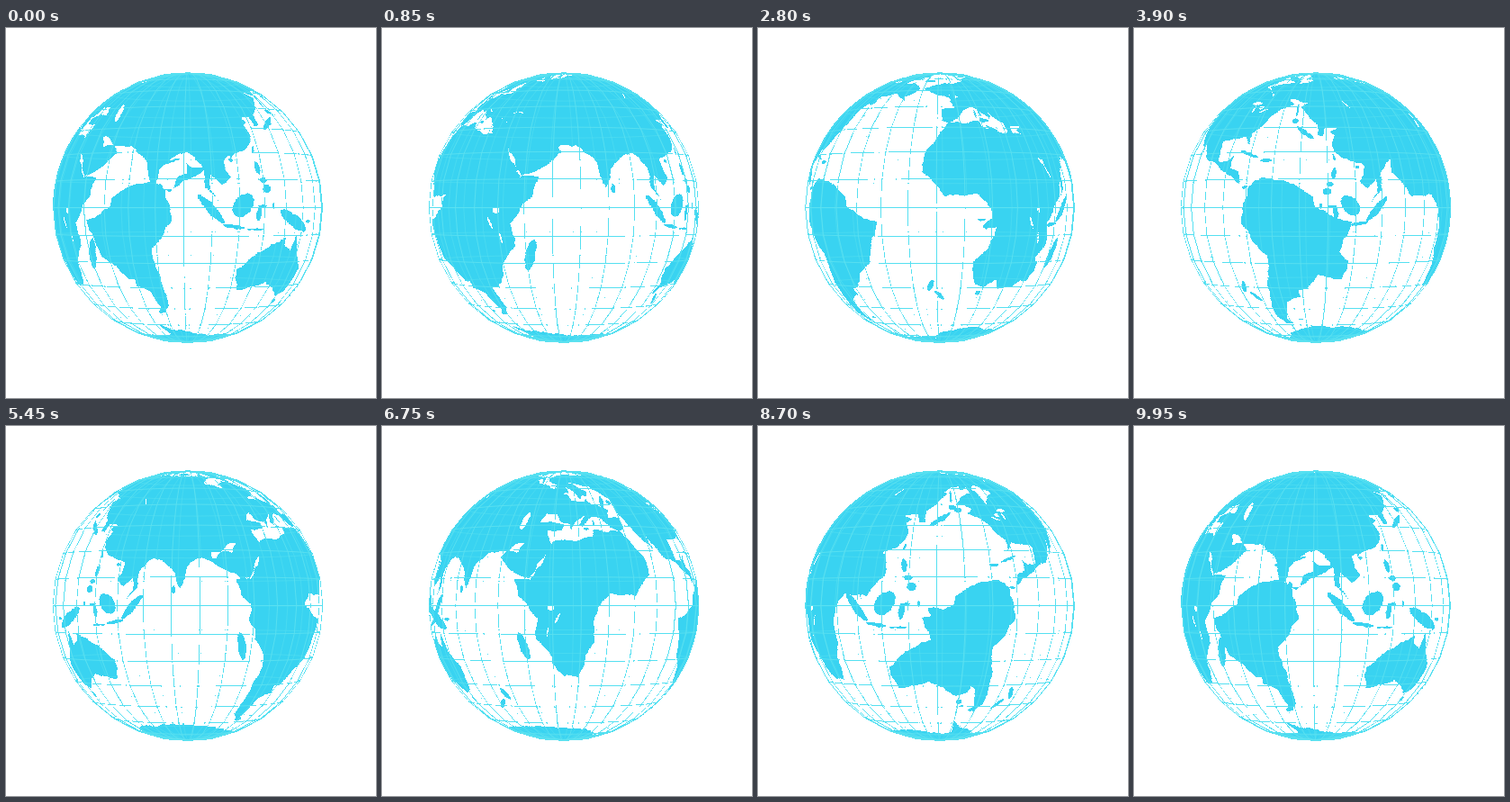
Write an HTML page with a canvas that moves like this. It is 411 px wide and 411 px high and loops after 10000 ms.

```html
<!DOCTYPE html>
<html lang="en">
<head>
<meta charset="utf-8">
<title>Transparent globe</title>
<style>
  html, body { margin: 0; width: 100%; height: 100%; overflow: hidden; background: #fff; }
  canvas { display: block; }
</style>
</head>
<body>
<canvas id="stage" width="411" height="411"></canvas>
<script>
const SIZE = 411, CX = 202, CY = 199.6, RADIUS = 149.4;
const EYE = 11.5;              // camera distance in globe radii
const FOCAL = RADIUS * EYE;
const LOOP = 10000, STEP = 50; // ms
const START = 91.6, SPEED = 0.03625; // degrees, degrees per ms
const GRID = 11.25, RAD = Math.PI / 180;
const WHITE = 0xffffffff, LAND = 0xfff1d339, LINE = 0xfff1e055; // ABGR

// Flat map, four pixels per degree
const MAP_W = 1440, MAP_H = 720, PER_DEG = 4;
const map = new OffscreenCanvas(MAP_W, MAP_H).getContext('2d', { willReadFrequently: true });

let seed = 7;
function random() {
  seed = (seed * 16807) % 2147483647;
  return seed / 2147483647;
}

// Fractal coast: the middle of each stretch is pushed sideways until stretches are short
function coast(path, x1, y1, x2, y2) {
  const dx = x2 - x1, dy = y2 - y1, length = Math.hypot(dx, dy);
  if (length < 0.8) return path.lineTo(x2, y2);
  const push = (random() - 0.5) * 0.2 * Math.min(1, 8 / length);
  const mx = (x1 + x2) / 2 - dy * push, my = (y1 + y2) / 2 + dx * push;
  coast(path, x1, y1, mx, my);
  coast(path, mx, my, x2, y2);
}

// Fills an outline through key points lon, lat, lon, lat, ...
function land(...pts) {
  const path = new Path2D(), n = pts.length;
  path.moveTo(pts[0], pts[1]);
  for (let i = 0; i < n; i += 2)
    coast(path, pts[i], pts[i + 1], pts[(i + 2) % n], pts[(i + 3) % n]);
  for (const shift of [180, -180]) {
    map.setTransform(PER_DEG, 0, 0, -PER_DEG, shift * PER_DEG, 90 * PER_DEG);
    map.fill(path);
  }
}

// Rough ellipse, tilted counterclockwise
function isle(lon, lat, rx, ry, tilt = 0) {
  const pts = [], c = Math.cos(tilt * RAD), s = Math.sin(tilt * RAD);
  for (let a = 0; a < 360; a += 30) {
    const x = rx * Math.cos(a * RAD), y = ry * Math.sin(a * RAD);
    pts.push(lon + x * c - y * s, lat + x * s + y * c);
  }
  land(...pts);
}
function lake(...shape) {
  map.globalCompositeOperation = 'destination-out';
  isle(...shape);
  map.globalCompositeOperation = 'source-over';
}

// Africa
land(-6,36, 10,37, 11,33.5, 20,31, 32.5,31, 37,21, 43,12, 51,12, 48,4, 39,-6, 40.6,-15, 35,-21, 32.5,-28,
  27,-34, 19,-34.5, 12,-17, 13,-8, 9,2, 5,5.5, -8,4.5, -17,14, -16,22, -10,31);
isle(46.8, -19, 7, 2.1, 72);
lake(33, -1, 1.6, 1.4);
lake(30, -6, 2.8, 0.5, -65);
lake(34.6, -12, 2.3, 0.4, -80);

// Europe
land(-9,37, -9,43.2, -1.5,43.6, -4,48.3, 4,52, 8.5,54, 9,57.5, 11,54, 20,54.5, 24,59.5, 38,64, 44,67, 62,69,
  62,45, 41,42, 38,46.5, 31,46.3, 28,41.3, 23,40.4, 23,36.6, 19.5,41.8, 13,45.5, 18,40, 16,38.3, 9.5,44.3,
  3,43, -1,38, -5.5,36);
land(8,58, 5.5,62, 16,69, 26,71, 41,67, 32,66.5, 38,63, 29,60, 22,61, 25,65.5, 18,62, 14,55.5, 11,59);
isle(-2.5, 54, 4.5, 1.7, 115);
isle(-8, 53.3, 1.8, 1.5);
isle(-19, 65, 5, 1.3);
isle(18, 79, 6, 1.5);
isle(58, 73.8, 7, 1.2, 40);
isle(14, 37.5, 1.5, 0.7);
isle(9, 41, 2, 0.5, 90);

// Asia
land(58,69, 70,73, 104,77.5, 140,72.5, 180,69, 190,66, 178,62.5, 163,59, 157,51, 156,58, 162,61.5, 136,55, 141,52,
  129,41, 129,35.3, 126,35, 125,39.5, 118,39, 122,36.8, 119.5,35, 121.8,30, 117,23.5, 106,20, 58,31);
land(107,24, 106,19, 109,12, 105,9, 100.8,13.3, 100.3,7, 104,1.4, 98.3,8, 97,17, 91,22.5, 87,21.3, 80,15, 77.6,8,
  73,20, 66,25.3, 57,25.5, 50,30, 48,30, 51,25, 56,26, 59.8,22.5, 52,16, 43.5,12.8, 39,21, 33,29, 34.5,31.5,
  36,36.5, 28,36.8, 26.5,40, 35,42, 41,41, 41,43, 60,48, 64,36);
lake(51, 42, 5.3, 1.9, 105);
lake(107, 53.5, 3.2, 0.5, 50);
isle(80.7, 7.5, 1.9, 0.9, 90);
isle(121, 23.7, 1.7, 0.6, 70);
isle(109.7, 19.1, 1, 0.8);
isle(136.5, 36.7, 6.3, 1.3, 33);
isle(143, 43.3, 2, 1.4);
isle(143, 50, 4, 0.8, 85);
isle(121.5, 16, 2.8, 1.2, 100);
isle(123.5, 11, 1.8, 1);
isle(125, 7.5, 2, 1.6);
isle(114, 1, 5.5, 3.8, 45);
isle(100.8, -0.5, 7.8, 1.7, -46);
isle(110, -7.4, 4.8, 0.7, -8);
isle(119.5, -8.6, 4, 0.4);
isle(121, -2.2, 3.2, 1.2, 80);
isle(122.5, 0.7, 2.2, 0.5);
isle(128, 0.8, 1.4, 0.5, 90);

// Oceania
land(142.5,-11, 146,-19, 153,-26, 150,-37, 144,-38.7, 137.5,-34, 131,-31.5, 124,-33.5, 116,-35, 113.5,-25, 122,-18,
  129,-14.5, 136,-12, 136,-15, 140.5,-17.5);
isle(140.5, -5.3, 10, 2.5, -24);
isle(150.5, -5.5, 2, 0.6);
isle(146.5, -42, 1.6, 1.4);
isle(175.5, -38, 3.5, 1.5, -60);
isle(170.3, -43.7, 4, 1.2, 42);

// North America
land(-168,66, -156,71, -128,70, -95,68, -94,71.5, -83,68, -94,60, -82.5,55, -79.5,51.5, -78,62, -70,60, -62,58,
  -56,52.5, -66,50, -62,46, -70,43, -75.5,36, -81,31, -80.3,25.5, -84,30, -97,28, -96,19, -91,18.7, -87.3,21.3,
  -88,16, -83.5,14.5, -82,9, -77.5,8.5, -80,7.5, -87,13, -105,20, -113,31, -110,23, -120.5,34.5, -124,41,
  -124,48, -134,58, -148,61, -163,55, -158,58.5, -165,62);
land(-72,78, -33,83.5, -16,81, -22,70.5, -40,65, -43.5,60, -50,62, -54,69, -58,75);
lake(-87.5, 47.5, 3.5, 1);
lake(-87, 44, 2.2, 0.6, 80);
lake(-82.5, 44.8, 1.8, 1);
lake(-80, 42.9, 3, 0.5, 20);
isle(-74.5, 68.5, 12, 2.5, -24);
isle(-78, 80, 12, 2.5, 15);
isle(-111, 71, 7, 2);
isle(-122, 73, 3, 1.6);
isle(-87, 75.8, 8, 0.8);
isle(-79.5, 21.7, 5, 0.7, -18);
isle(-71, 19, 2.5, 0.8);
isle(-56, 48.7, 2.6, 1.7);

// South America
land(-77.5,8.5, -72,12, -62,10.5, -51,4, -50,0, -35.5,-5.5, -39,-14, -41.5,-22.5, -48.5,-27, -54,-34.3, -58,-34.5,
  -57.5,-38, -65,-41, -69,-51, -65.5,-54.7, -71,-55, -75,-50, -73.5,-38, -70.5,-19, -76,-14, -81,-5.5, -80,1);
isle(-59.5, -51.8, 1.5, 0.6);

// Antarctica
land(-180,-78, -100,-73, -67,-68, -58,-63.5, -62,-74, -45,-77, 0,-70, 60,-67, 135,-66, 168,-72, 180,-78,
  180,-100, -180,-100);

const mapPixels = map.getImageData(0, 0, MAP_W, MAP_H).data;

// For each screen pixel on the globe: map row and column of its near and far surface points
const rays = [];
for (let y = 0; y < SIZE; y++) for (let x = 0; x < SIZE; x++) {
  const a = (x + 0.5 - CX) / FOCAL, b = (CY - y - 0.5) / FOCAL;
  const k = a * a + b * b, disc = 1 + k - k * EYE * EYE;
  if (disc < 0) continue;
  const hits = [1, -1].map(side => {
    const z = (k * EYE + side * Math.sqrt(disc)) / (1 + k), depth = EYE - z;
    const lat = Math.asin(Math.max(-1, Math.min(1, b * depth))) / RAD;
    const lon = Math.atan2(a * depth, z) / RAD;
    return [Math.min(MAP_H - 1, Math.floor((90 - lat) * PER_DEG)) * MAP_W, (lon + 540) * PER_DEG];
  });
  rays.push([y * SIZE + x, ...hits.flat()]);
}

const ctx = document.getElementById('stage').getContext('2d', { willReadFrequently: true });
const image = ctx.createImageData(SIZE, SIZE);
const pixels = new Uint32Array(image.data.buffer);

function drawLand(center) {
  const shift = center * PER_DEG;
  const isLand = (row, col) => mapPixels[(row + Math.floor(col + shift) % MAP_W) * 4 + 3] > 127;
  pixels.fill(WHITE);
  for (const [at, row1, col1, row2, col2] of rays)
    if (isLand(row1, col1) || isLand(row2, col2)) pixels[at] = LAND;
  ctx.putImageData(image, 0, 0);
}

function project(lon, lat) {
  const c = Math.cos(lat * RAD), z = c * Math.cos(lon * RAD), s = FOCAL / (EYE - z);
  return [CX + c * Math.sin(lon * RAD) * s, CY - Math.sin(lat * RAD) * s, z];
}

function drawGrid(center) {
  const near = new Path2D(), far = new Path2D();
  const edge = (p, q) => {
    const path = p[2] + q[2] > 0 ? near : far;
    path.moveTo(p[0], p[1]);
    path.lineTo(q[0], q[1]);
  };
  for (let i = 0; i < 32; i++) for (let j = -8; j < 8; j++) {
    const lon = i * GRID - center, lat = j * GRID, p = project(lon, lat);
    edge(p, project(lon, lat + GRID));
    if (j > -8) edge(p, project(lon + GRID, lat));
  }
  ctx.strokeStyle = '#60e3f1';
  ctx.lineWidth = 1;
  ctx.globalAlpha = 0.4;
  ctx.stroke(far);
  ctx.globalAlpha = 0.8;
  ctx.stroke(near);
  ctx.globalAlpha = 1;
}

// Over the sea, faint line pixels vanish and strong ones turn solid, which breaks lines into dashes
function hardenSeaLines() {
  const drawn = ctx.getImageData(0, 0, SIZE, SIZE);
  const out = new Uint32Array(drawn.data.buffer);
  for (let i = 0; i < out.length; i++)
    if (pixels[i] === WHITE) out[i] = (out[i] & 255) < 172 ? LINE : WHITE;
  ctx.putImageData(drawn, 0, 0);
}

let shown = -1;
function frame() {
  const time = Math.floor(performance.now() % LOOP / STEP) * STEP;
  if (time !== shown) {
    shown = time;
    const center = (START - time * SPEED + 720) % 360;
    drawLand(center);
    drawGrid(center);
    hardenSeaLines();
  }
  requestAnimationFrame(frame);
}
frame();
</script>
</body>
</html>
```
